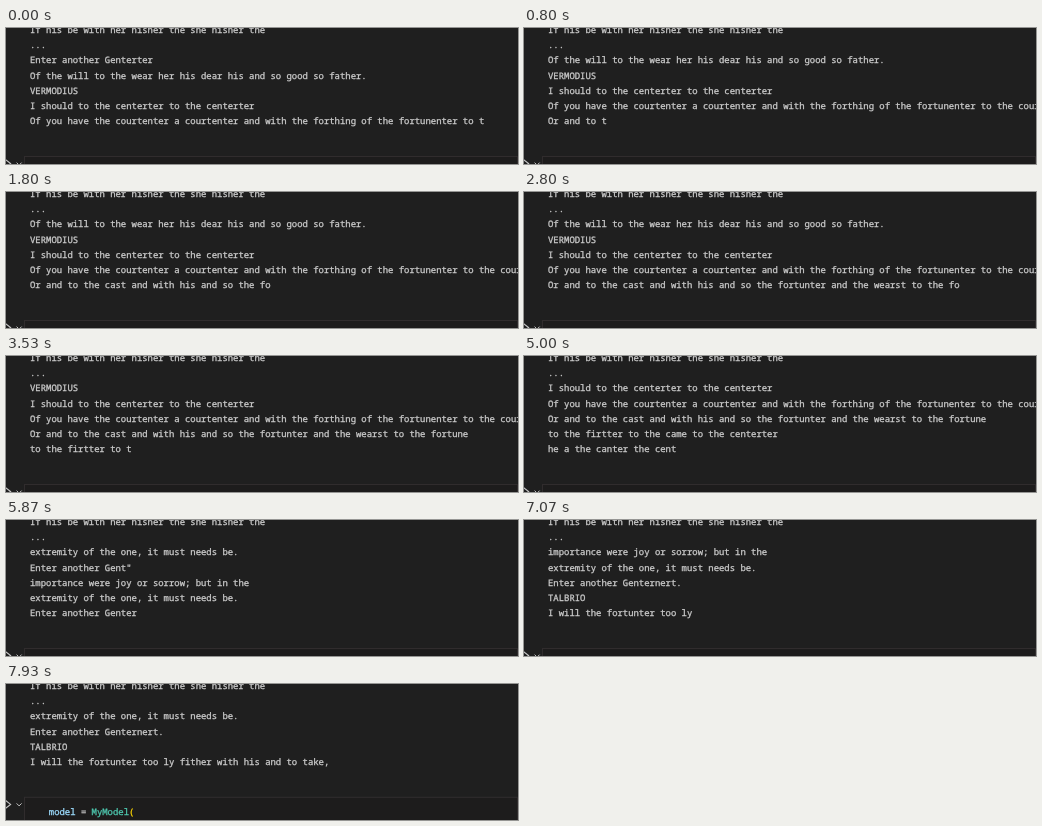
These frames come from a looping animation (512 px wide and 136 px high, 8000 ms). An HTML page:

```html
<!DOCTYPE html>
<html lang="en">
<head>
<meta charset="utf-8">
<title>Generated text</title>
<style>
  html, body { margin: 0; width: 100%; height: 100%; overflow: hidden; background: #1f1f1f; }
  svg { display: block; width: 100vw; height: 100vh; }
  text {
    font: 8.925px "Noto Sans Mono", "DejaVu Sans Mono", monospace;
    fill: #cccccc;
    stroke: #cccccc;
    stroke-width: 0.3;
    white-space: pre;
    text-rendering: geometricPrecision;
  }
  .name { fill: #9cdcfe; stroke: #9cdcfe; }
  .type { fill: #4ec9b0; stroke: #4ec9b0; }
  .paren { fill: #ffd700; stroke: #ffd700; }
</style>
</head>
<body>
<svg viewBox="0 0 512 136">
  <rect width="512" height="136" fill="#1f1f1f"/>
  <g id="output"></g>
  <g id="cell">
    <rect x="18.5" y="128.5" width="493" height="60" fill="#1d1c1c" stroke="#302c2d"/>
    <path d="M-1 131.2L4.6 135.6L-1 140" fill="none" stroke="#c5c5c5" stroke-width="1.1"/>
    <path d="M10.6 134.6L13.1 137.1L15.6 134.6" fill="none" stroke="#c5c5c5"/>
    <text x="42.8" y="146.4"><tspan class="name">model</tspan> = <tspan class="type">MyModel</tspan><tspan class="paren">(</tspan></text>
  </g>
</svg>
<script>
const LOOP = 8000, TICKS = 120;
const LEFT = 24, BASELINE = 35.3, PITCH = 15.2, ROWS = 5;

const seed = `importance were joy or sorrow; but in the
extremity of the one, it must needs be.
Enter another Gent`;

// keys: [tick, characters typed after the lead text]
const passes = [
  {
    from: 0,
    lead: `Enter another Genterter
Of the will to the wear her his dear his and so good so father.
VERMODIUS
I should to the centerter to the centerter
`,
    typed: `Of you have the courtenter a courtenter and with the forthing of the fortunenter to the courtenter
Or and to the cast and with his and so the fortunter and the wearst to the fortune
to the firtter to the came to the centerter
he a the canter the centerter to the centerter a`,
    keys: [[0, 85], [7, 99], [19, 127], [27, 144], [32, 154], [44, 181], [45, 184],
      [46, 185], [53, 201], [59, 215], [72, 243], [75, 250], [85, 272], [86, 274]]
  },
  {
    from: 87,
    lead: `${seed}"\n${seed}`,
    typed: `ernert.
TALBRIO
I will the fortunter too ly fither with his and to take,
`,
    keys: [[87, 0], [88, 2], [91, 9], [98, 25], [106, 43], [111, 54], [119, 73]]
  }
];

const output = document.getElementById("output");
const cell = document.getElementById("cell");

function addLine(row, content = "") {
  const line = document.createElementNS("http://www.w3.org/2000/svg", "text");
  line.setAttribute("x", LEFT);
  line.setAttribute("y", BASELINE + row * PITCH);
  line.textContent = content;
  return output.appendChild(line);
}

addLine(-2, "If his be with her hisher the she hisher the");
addLine(-1, "...");
const rows = Array.from({ length: ROWS }, (_, i) => addLine(i));

function countAt(keys, tick) {
  const next = keys.findIndex(([t]) => t >= tick);
  if (next === 0) return keys[0][1];
  const [t0, n0] = keys[next - 1], [t1, n1] = keys[next];
  return Math.floor(n0 + (n1 - n0) * (tick - t0) / (t1 - t0) + 0.001);
}

function draw(tick) {
  const pass = passes[tick < passes[1].from ? 0 : 1];
  const text = pass.lead + pass.typed.slice(0, countAt(pass.keys, tick));
  const lines = text.split("\n").slice(-ROWS);
  rows.forEach((row, i) => { row.textContent = lines[i]; });
  // An empty last line collapses and pulls the cell up.
  cell.setAttribute("transform", `translate(0 ${lines[ROWS - 1] ? 0 : -PITCH})`);
}

let shown = -1;
function frame() {
  const time = performance.now() % LOOP;
  const tick = Math.floor((time + 3.4) * TICKS / LOOP) % TICKS;
  if (tick !== shown) draw(shown = tick);
  requestAnimationFrame(frame);
}
frame();
</script>
</body>
</html>
```
